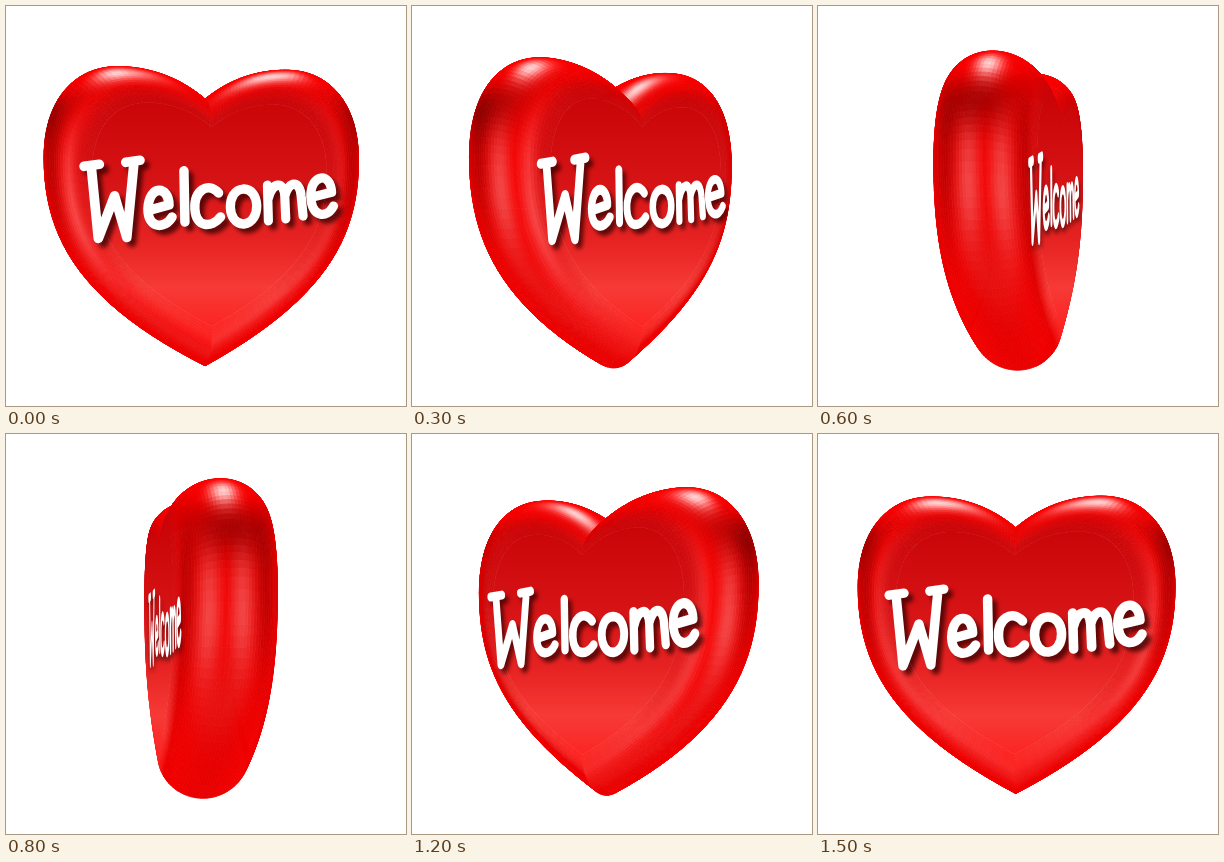
These frames come from a looping animation (400 by 400 pixels, 1.6 s). An HTML page with a canvas:

```html
<!DOCTYPE html>
<html lang="en">
<head>
<meta charset="utf-8">
<title>Welcome heart</title>
<style>
  html, body { margin: 0; width: 100%; height: 100%; overflow: hidden; background: #fff; }
  canvas { display: block; }
</style>
</head>
<body>
<canvas id="stage" width="400" height="400" role="img" aria-label="Welcome"></canvas>
<script>
const ctx = document.getElementById('stage').getContext('2d');
const STEPS = 16, STEP_MS = 100, START_YAW = 9.25;
const CX = 198, CY = 203, CAMERA = 1050, DEPTH = 45, FACE = 0.72, TEXT_Z = 40;
const TEXT_SCALE = (CAMERA - TEXT_Z) / CAMERA;
const SLICES = 48;

// Right half of the heart outline, from notch to tip.
const CURVES = [
  [0, -109, 25, -130, 54, -140, 85, -140],
  [85, -140, 130, -140, 158, -105, 158, -50],
  [158, -50, 158, 33, 118, 94, 0, 156]
];

// Letter strokes with the centre of each letter.
const LETTERS = [
  [100, 195, 'M72 161L87 159M79 161L86 232L102 190L114 231L121 158M113 157L127 155'],
  [146, 201, 'M137 204L156 199C156 180 136 178 135 203C135 223 152 223 159 211'],
  [172, 190, 'M171 165L172 216'],
  [195, 200, 'M206 187C195 175 181 185 182 203C183 222 199 222 208 211'],
  [232, 200, 'M231 183C213 184 214 219 232 218C250 216 249 182 231 183'],
  [274, 196, 'M256 179L257 215M257 192C261 176 273 174 274 190L275 213M274 190C278 174 290 174 291 190L293 210'],
  [312, 190, 'M302 191L323 186C322 165 301 167 301 190C302 212 318 213 325 200']
].map(([x, y, d]) => ({ x, y, path: new Path2D(d) }));

const clamp = v => Math.max(0, Math.min(1, v));
const bump = (v, mid, width) => Math.exp(-(((v - mid) / width) ** 2));
const mix = (a, b, k) => a.map((v, i) => v + (b[i] - v) * k);
const rgb = c => `rgb(${c.map(v => Math.round(Math.max(0, Math.min(255, v))))})`;

function bezier(c, t) {
  const u = 1 - t;
  const at = i => u * u * u * c[i] + 3 * u * u * t * c[i + 2] + 3 * u * t * t * c[i + 4] + t * t * t * c[i + 6];
  return [at(0), at(1)];
}

function buildOutline() {
  const half = [];
  for (const c of CURVES) for (let i = 0; i < 24; i++) half.push(bezier(c, i / 24));
  const left = half.slice(1).reverse().map(([x, y]) => [-x, y]);
  return [...half, [0, 156], ...left];
}

const outline = buildOutline();
const COUNT = outline.length;
const normals = outline.map(([x, y], i) => {
  const [nextX, nextY] = outline[(i + 1) % COUNT];
  const dx = nextX - x, dy = nextY - y, len = Math.hypot(dx, dy);
  return [dy / len, -dx / len];
});

function makeProjector(yaw) {
  const c = Math.cos(yaw), s = Math.sin(yaw), grow = 1 + 0.035 * s * s;
  return (x, y, z) => {
    const depth = z * c - x * s, k = grow * CAMERA / (CAMERA - depth);
    return [CX + (x * c + z * s) * k, CY + y * k, depth];
  };
}

const FACE_STOPS = [[-105, [202, 5, 8]], [-30, [213, 18, 20]], [30, [230, 35, 34]], [75, [246, 58, 54]], [115, [252, 36, 34]]];

function faceColor(y) {
  let i = 0;
  while (i < FACE_STOPS.length - 2 && y > FACE_STOPS[i + 1][0]) i++;
  const [y0, a] = FACE_STOPS[i], [y1, b] = FACE_STOPS[i + 1];
  return mix(a, b, clamp((y - y0) / (y1 - y0)));
}

// Glossy red: dark upper side, pale streaks around the middle, plain red below.
function rimColor(nx, ny, nz, edge) {
  const across = Math.abs(nx);
  const upper = bump(ny, -0.32, 0.24) * edge * edge;
  const flank = bump(ny, 0, 0.35) * bump(across, 0.75, 0.22);
  const streak = bump(ny, 0.12, 0.26) * bump(across, 0.3, 0.22);
  const lower = clamp(ny) * bump(nz, 0.85, 0.15);
  const shine = Math.max(0, -0.75 * ny + 0.66 * nz) ** 32;
  const red = 250 - 80 * upper - 50 * flank - 40 * clamp(ny) * edge * nz;
  const pale = 65 * streak + 30 * lower + 215 * shine;
  return [red + 20 * shine, pale, pale];
}

function polygon(pts) {
  ctx.beginPath();
  for (const [x, y] of pts) ctx.lineTo(x, y);
  ctx.closePath();
}

function drawRim(project, yaw) {
  const c = Math.cos(yaw), s = Math.sin(yaw), quads = [];
  const rings = Array.from({ length: SLICES + 1 }, (_, j) => {
    const phi = (j / SLICES - 0.5) * Math.PI;
    const k = FACE + (1 - FACE) * Math.cos(phi), z = DEPTH * Math.sin(phi);
    return outline.map(([x, y]) => project(x * k, y * k, z));
  });
  for (let j = 0; j < SLICES; j++) {
    const phi = ((j + 0.5) / SLICES - 0.5) * Math.PI;
    const cp = Math.cos(phi), sp = Math.sin(phi);
    const blend = clamp((sp - 0.88) / 0.115);
    for (let i = 0; i < COUNT; i++) {
      const [ox, oy] = normals[i], n = (i + 1) % COUNT;
      const nx = ox * cp * c + sp * s, ny = oy * cp, nz = sp * c - ox * cp * s;
      if (nz < -0.3) continue;
      const pts = [rings[j][i], rings[j][n], rings[j + 1][n], rings[j + 1][i]];
      const color = mix(rimColor(nx, ny, nz, cp), faceColor(outline[i][1] * FACE), blend);
      quads.push({ pts, color: rgb(color), depth: pts[0][2] + pts[2][2] });
    }
  }
  quads.sort((a, b) => a.depth - b.depth);
  ctx.lineWidth = 0.8;
  for (const { pts, color } of quads) {
    ctx.fillStyle = ctx.strokeStyle = color;
    polygon(pts);
    ctx.fill();
    ctx.stroke();
  }
}

function drawFace(project) {
  const [, top] = project(0, -105, DEPTH), [, bottom] = project(0, 115, DEPTH);
  const fill = ctx.createLinearGradient(0, top, 0, bottom);
  for (const [y, color] of FACE_STOPS) fill.addColorStop((y + 105) / 220, rgb(color));
  ctx.fillStyle = fill;
  polygon(outline.map(([x, y]) => project(x * FACE, y * FACE, DEPTH)));
  ctx.fill();
}

// Local affine frame of the text plane around (x, y).
function placeOnFace(project, x, y, shift) {
  const at = (px, py) => project((px - CX) * TEXT_SCALE, (py - CY) * TEXT_SCALE, TEXT_Z);
  const sx = x + shift, sy = y + shift;
  const o = at(sx, sy), u = at(sx + 1, sy), v = at(sx, sy + 1);
  ctx.setTransform(u[0] - o[0], u[1] - o[1], v[0] - o[0], v[1] - o[1], o[0], o[1]);
  ctx.translate(-x, -y);
}

function strokeText(project, color, width, shift) {
  ctx.strokeStyle = color;
  ctx.lineWidth = width;
  for (const { x, y, path } of LETTERS) {
    placeOnFace(project, x, y, shift);
    ctx.stroke(path);
  }
}

function drawText(project) {
  ctx.save();
  ctx.lineCap = ctx.lineJoin = 'round';
  ctx.globalCompositeOperation = 'source-atop';
  ctx.filter = 'blur(2px)';
  strokeText(project, 'rgba(60,0,0,.8)', 9, 5);
  ctx.filter = 'none';
  strokeText(project, '#fff', 9.5, 0);
  ctx.restore();
}

function draw(step) {
  let degrees = START_YAW + step * 180 / STEPS;
  if (degrees > 90) degrees -= 180;
  const yaw = degrees * Math.PI / 180;
  const project = makeProjector(yaw);
  ctx.clearRect(0, 0, 400, 400);
  drawRim(project, yaw);
  if (CAMERA * Math.cos(yaw) > DEPTH) {
    drawFace(project);
    drawText(project);
  }
}

let shown = -1;
function tick() {
  const step = Math.floor(performance.now() / STEP_MS) % STEPS;
  if (step !== shown) draw(shown = step);
  requestAnimationFrame(tick);
}
tick();
</script>
</body>
</html>
```
